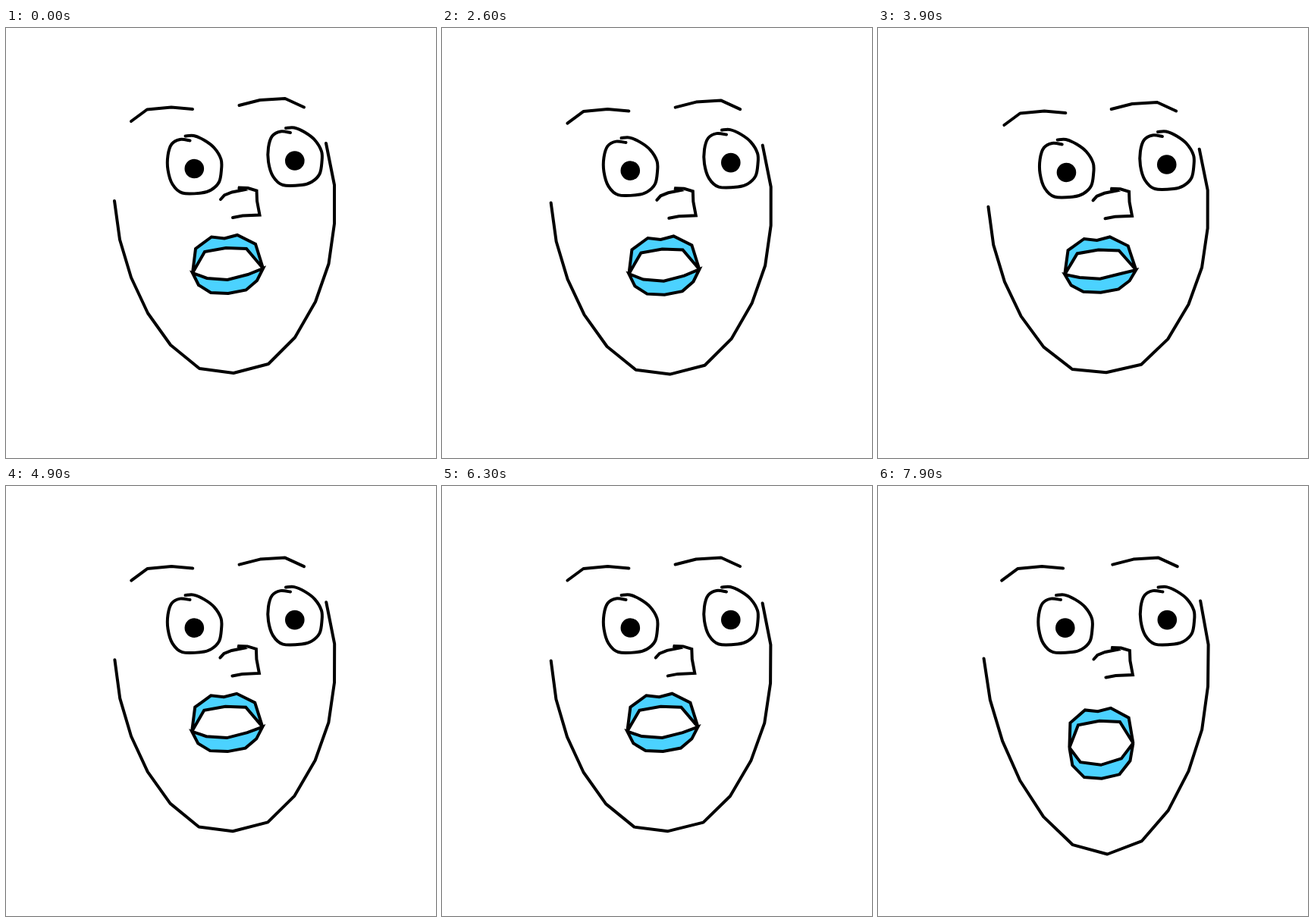
These frames come from a looping animation (567x567 px, 8000 ms). An HTML page:

```html
<!DOCTYPE html>
<html lang="en">
<head>
<meta charset="utf-8">
<title>Face</title>
<style>
html, body { margin: 0; width: 100%; height: 100%; overflow: hidden; background: #fff; }
svg { display: block; width: 100%; height: 100%; }
path { fill: none; stroke: #000; stroke-width: 4; stroke-linecap: round; stroke-linejoin: round; }
.sharp { stroke-linejoin: miter; }
.lip { fill: #4bd2ff; stroke-linejoin: miter; }
</style>
</head>
<body>
<svg id="stage" viewBox="0 0 567 567"></svg>
<script>
const LOOP = 8000, STEP = 100;

// drop: eyes and brows move down; side: ends of the jaw line move down;
// sway: chin and mouth move right; open: how far the mouth opens
const poses = [
  { t: 0, drop: 0, side: 0, sway: 0, open: 0 },
  { t: 1400, drop: 0, side: 1.3, sway: -.8, open: 0 },
  { t: 2600, drop: 2.6, side: 2.6, sway: .5, open: .01 },
  { t: 3900, drop: 5, side: 7.7, sway: .9, open: -.11 },
  { t: 4900, drop: 1.6, side: 1.3, sway: -1, open: -.02 },
  { t: 6300, drop: 1.5, side: 2.5, sway: -2, open: -.02 },
  { t: 7900, drop: 1.6, side: -.5, sway: 2.4, open: 1 }
];

const pts = s => s.split(' ').map(p => p.split(',').map(Number));
const jaw = pts('143,228 150,279 165,329 187,376 217,418 255,449 300,455 346,443 381,408 408,361 425.5,311 433,258 433,207 422,152');
const leftBrow = pts('165,123 186,107.5 218,104.5 246,107');
const rightBrow = pts('307.5,102 335,95 368,93 393,104.5');
const nose = pts('283,226 288,220.5 298,216.5 313,213.5 306,210.5 319,211 330.5,214.5 331,228 334.5,246.5 312,247.5 299,250');
const eye = pts('243,148.5 230,147 219,153 214,168 214,187 220,206 233,217.5 258,217.5 271,213.5 281.5,203 284.5,187 284,173 275,158 262,148 248,142 237,142.5');
const upperLip = pts('246,323 250,291 271,275.5 288,277.5 305,273 329,285 339,317 317,291 290,290 262,295');
const lowerLip = pts('339,317 331,333 316.5,345.5 293,350 270,349 254,339 246,323 265,330 292,332 319,325');
const CHIN = 6;

const stage = document.getElementById('stage');
function add(cls = '') {
  const el = document.createElementNS('http://www.w3.org/2000/svg', 'path');
  el.setAttribute('class', cls);
  stage.appendChild(el);
  return d => el.setAttribute('d', d);
}
const draw = {
  jaw: add(), leftBrow: add(), rightBrow: add(), leftEye: add(), rightEye: add(),
  leftPupil: add(), rightPupil: add(), nose: add('sharp'),
  upperLip: add('lip'), lowerLip: add('lip')
};

const mix = (a, b, k) => a + (b - a) * k;
const move = (list, dx, dy) => list.map(([x, y]) => [x + dx, y + dy]);
const line = list => 'M' + list.join('L');

// Smooth curve that passes through every point
function curve(list) {
  const at = i => list[Math.max(0, Math.min(list.length - 1, i))];
  const handle = (i, s) => at(i).map((v, c) => v + s * (at(i + 1)[c] - at(i - 1)[c]) / 6);
  return 'M' + list[0] + list.slice(1).map((p, i) =>
    'C' + [handle(i, 1), handle(i + 1, -1), p].join(' ')).join('');
}

// A dot drawn as a thick ring
const dot = (x, y, r = 6.4) =>
  `M${x - r},${y}a${r},${r} 0 1 1 ${2 * r},0a${r},${r} 0 1 1 ${-2 * r},0Z`;

function poseAt(t) {
  let n = 0;
  while (n < poses.length - 2 && t >= poses[n + 1].t) n++;
  const a = poses[n], b = poses[n + 1];
  let k = (t - a.t) / (b.t - a.t);
  if (b.open === 1) k **= 1.7;
  return Object.fromEntries(Object.keys(a).map(c => [c, mix(a[c], b[c], k)]));
}

function moveJaw({ drop, side, sway, open }) {
  const chinDrop = .5 * drop + 29.7 * open;
  return jaw.map(([x, y], i) => {
    const span = i < CHIN ? CHIN : jaw.length - 1 - CHIN;
    const w = (1 - Math.abs(i - CHIN) / span) ** 1.25;
    const spread = Math.sign(i - CHIN) * 3.3 * open * (1 - w) ** 3;
    return [x + mix(.27 * side, sway, w) + spread, y + mix(side, chinDrop, w)];
  });
}

// Points near a corner of the mouth follow that corner
function moveLip(list, dy, { drop, sway, open }) {
  const cornerDy = .4 * drop + 21.4 * Math.max(0, open);
  return list.map(([x, y]) => {
    const k = (x - 292.5) / 46.5;
    return [x + .8 * sway - 4.5 * open * Math.sign(k) * k ** 12, y + mix(dy, cornerDy, k ** 4)];
  });
}

function render(time) {
  const pose = poseAt(Math.floor(time % LOOP / STEP) * STEP);
  const { drop, side, sway, open } = pose;

  draw.jaw(line(moveJaw(pose)));
  draw.leftBrow(line(move(leftBrow, .15 * side - 1.8 * open, drop)));
  draw.rightBrow(line(move(rightBrow, .05 * side + 1.8 * open, drop)));
  draw.nose(line(move(nose, .6 * sway, .3 * drop + 2 * open)));
  draw.upperLip(line(moveLip(upperLip, .5 * drop + 19 * Math.max(0, open), pose)) + 'Z');
  draw.lowerLip(line(moveLip(lowerLip, .5 * drop + 35 * open, pose)) + 'Z');

  const leftX = -.5 - 1.5 * open, rightX = 132 + .5 * open;
  draw.leftEye(curve(move(eye, leftX, drop)));
  draw.rightEye(curve(move(eye, rightX, drop - 10.5)));
  draw.leftPupil(dot(248.8 + leftX, 185.5 + drop));
  draw.rightPupil(dot(248.8 + rightX, 175 + drop));
}

for (const p of stage.querySelectorAll('path:nth-child(6), path:nth-child(7)')) p.style.strokeWidth = 12.8;

const start = performance.now();
function tick() {
  render(performance.now() - start);
  requestAnimationFrame(tick);
}
tick();
</script>
</body>
</html>
```
